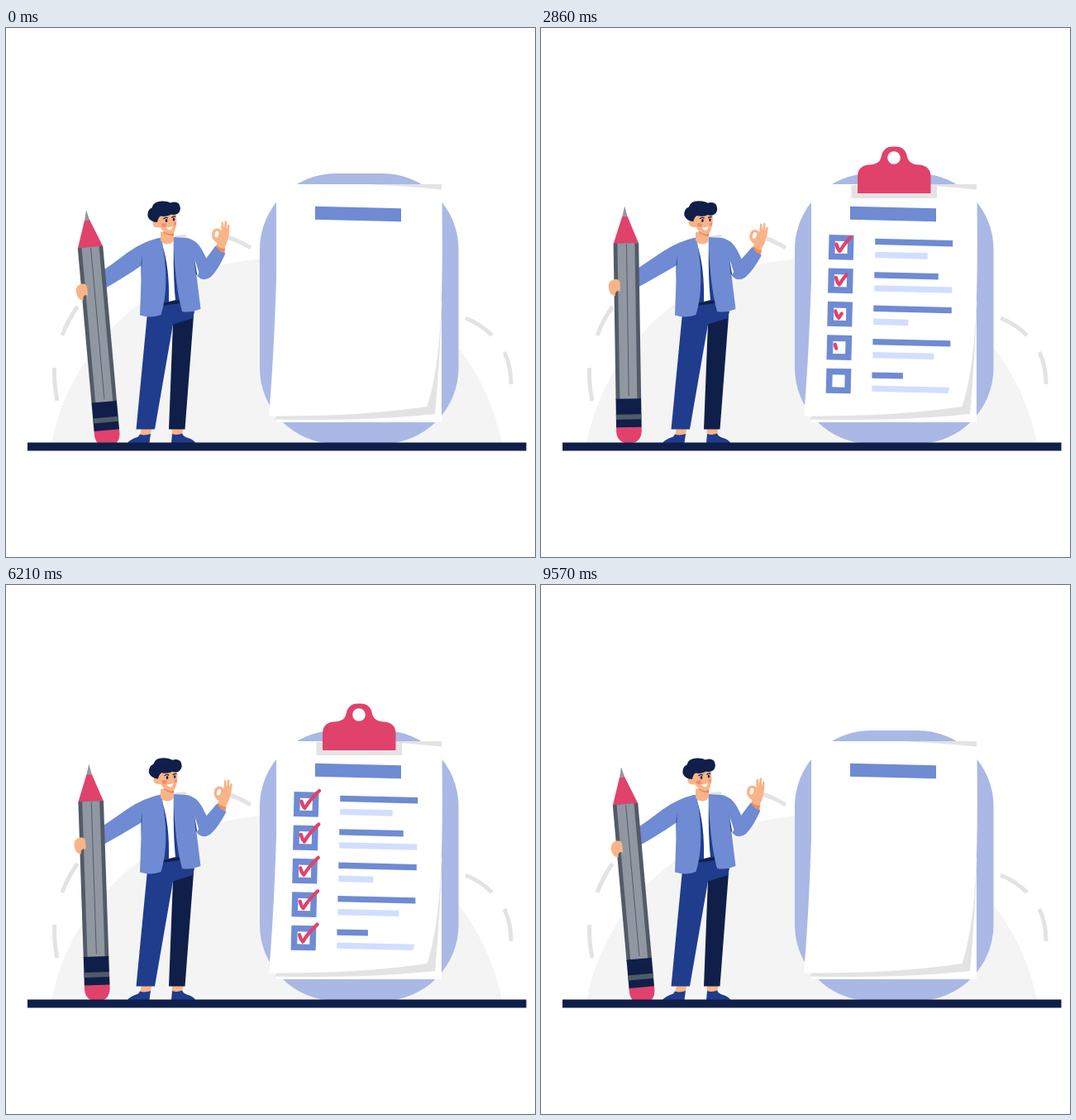
Animation of 640 by 640 pixels, one loop 9.64 s. Source, as an HTML page:

```html
<!DOCTYPE html>
<html lang="en">
<head>
<meta charset="utf-8">
<title>Checklist</title>
<style>
html, body { margin: 0; width: 100%; height: 100%; overflow: hidden; background: #fff; }
svg { display: block; width: 100vw; height: 100vh; }
.navy { fill: #0f1f49; } .deep { fill: #203c8c; } .blue { fill: #6e8bd3; } .pale { fill: #d1deff; }
.pink { fill: #e0426b; } .skin { fill: #f8b487; } .steel { fill: #9097a1; } .slate { fill: #515b68; }
.grey { fill: #e3e3e3; } .white { fill: #fff; }
.dash { fill: none; stroke: #e3e3e3; stroke-width: 5; }
.box { fill: #fff; stroke: #6e8bd3; stroke-width: 7.5; }
.tick { fill: none; stroke: #e0426b; stroke-width: 4.2; stroke-linecap: round; stroke-linejoin: round; }
.line { fill: none; stroke: #0f1f49; stroke-width: 1.3; }
</style>
</head>
<body>
<svg viewBox="0 0 640 640">
  <!-- backdrop -->
  <path fill="#f4f4f4" d="M55 502A278 278 0 0 1 600 502Z"/>
  <path class="dash" d="M62 451Q58 432 58.500 411M68 372Q75 353 86.500 337M204 254Q211 252.500 218 252.500M266 252.500Q282 257 296 266M556 351Q574 358 588 372M603 392Q611 409 611 431"/>

  <!-- board and paper -->
  <rect x="307" y="176" width="240.500" height="327" rx="92" fill="#a9b8e5"/>
  <path class="white" d="M327 189H527V477H327Z"/>
  <path class="grey" d="M437 189H527V196L470 194ZM527.500 330Q525 400 519 467Q430 476 325 473.500L330 465L505 450Z"/>
  <path class="white" d="M329 189H437Q482 191 527.500 195.500C528 300 530 395 509.500 458Q430 470 318 469.500Q328 350 329 189Z"/>
  <path class="blue" d="M374 215.700L478 218.300V234.300L374 231.700Z"/>

  <g id="list">
    <g id="clip">
      <path class="grey" d="M375.500 190H479V206H375.500Z"/>
      <path class="pink" d="M383 200V180Q383 167 396 165.500C407 165 410 162 411.500 156Q414 143.500 425 143.500H429Q441 143.500 443 156C445 162 448 165 458 165.500Q471.500 167 471.500 180V200Z"/>
      <circle class="white" cx="427" cy="157" r="7.800"/>
    </g>
  </g>

  <!-- man -->
  <path class="blue" id="sleeve"/>
  <path class="skin" d="M164 484H176.500L174.500 493H162ZM200.500 484H214.500L213 493H201Z"/>
  <path class="deep" d="M147 502Q151 497 160 494.500L162 491.500Q168 493.500 175 491L173.500 502ZM200 502L201 491Q207 493 213 490.500Q215 495 222 496.500Q228 499 229 502Z"/>
  <path class="navy" d="M202 357L227 348L216.500 485.500H197Z"/>
  <path class="deep" d="M171 345L190 333L211 329L228 343L226 351L202 358.500L180 485.500H157.500Z"/>
  <path class="navy" d="M189 331.500L211 328.500V333L189 336Z"/>
  <path class="deep" d="M187 256L204 254L211 329L189 333Z"/>
  <path class="white" d="M189 257L203 256.500Q202 300 205 329L197 331Q198 290 189 262Z"/>
  <path class="blue" d="M188 253.500Q172 257 163 266L164.500 276L162 347.500Q176 351.500 187.500 347Q199 310 188 253.500ZM202.500 253L219 254Q230 256 237 268L243 280L236 304L228 279L235.500 340Q224 345 213 343Q204 310 202.500 253Z"/>
  <path class="deep" d="M165 275L163.300 307L163.600 285ZM227.500 277L231.500 300L229.500 297Z"/>

  <g id="arm">
    <path class="skin" d="M253.500 266L255.500 260Q249.500 257 249 251Q249 245 253 243Q257 241.500 260.500 245L260.500 236Q261.500 232.500 263 236L264 243L264.500 234.500Q266 231.500 267 235L267 243L268.500 238Q270.500 237 270.500 240Q270.500 254 265 265L264 274Z"/>
    <ellipse class="white" cx="255" cy="249.500" rx="2.300" ry="4" transform="rotate(15 255 249.500)"/>
    <path fill="#ee8c5e" d="M255 262.500Q260 268 265 266.500L264 273L253.500 266Z"/>
    <path class="blue" d="M240.500 281L253.500 263.500Q258 271 265.500 272.500Q257 292 248 301Q239 308 231.500 300Z"/>
  </g>

  <path class="skin" d="M187 247H203V256Q202 261 195 261.500Q189 261 187 257Z"/>
  <g id="head">
    <path fill="#e9805c" d="M189 246L203 248L202.500 251.500Q195 251 189 246Z"/>
    <path class="skin" d="M180 222H205Q207.500 233 205.500 241Q204 249.500 199 249.500Q191 248 186.500 241.500Q178 242 177.500 237Q177 232 181 231Z"/>
    <path class="navy" d="M183 235Q174 234.500 171.500 228Q170.500 220 176.500 217.500Q178 210 188 209.500Q195 209 199 211.500Q205 209 209 212.500Q212.500 218 209.500 223Q206 227.500 200 225.500Q194 229 187 227.500Q184 229 183 235Z"/>
    <ellipse cx="191" cy="238.500" rx="3" ry="2.600" fill="#f58a77"/>
    <ellipse cx="204.500" cy="236.500" rx="1.500" ry="2.300" fill="#f58a77"/>
    <ellipse class="navy" cx="194" cy="233" rx="1.300" ry="1.900"/>
    <ellipse class="navy" cx="203" cy="231.500" rx="1.200" ry="1.900"/>
    <path class="line" d="M190.500 231Q193 228.500 196 230M200.500 229.500Q202 227.500 205 228"/>
    <path class="white" d="M194 241Q198 242 201.500 239.500Q201 244.500 198 244.500Q195 244 194 241Z"/>
  </g>

  <g id="pencil">
    <path class="pink" d="M-15.300 .5L-4 -33H2L15.300 .5ZM-15.300 221H15.300V228Q14 242 0 242Q-14 242 -15.300 228Z"/>
    <path class="steel" d="M-4 -33L-1 -45L2 -33Z"/>
    <path class="slate" d="M-15.300 0H15.300V189H-15.300Z"/>
    <path class="steel" d="M-10.500 0H10.500V189H-10.500Z"/>
    <path d="M.5 1V185" stroke="#515b68"/>
    <path class="navy" d="M-15.300 188H15.300V222.500H-15.300Z"/>
    <path class="slate" d="M-15.300 207H15.300V213H-15.300Z"/>
    <path class="skin" d="M-22 53C-22 45 -17 43 -12 43.500Q-7.500 44 -8 52V58Q-13 56 -14 61V63.500Q-21 63 -22 53Z"/>
  </g>
  <path class="navy" d="M26 501.500H629.500V511.500H26Z"/>
</svg>
<script>
const LOOP = 9640;
const $ = id => document.getElementById(id);
const clamp = v => Math.min(1, Math.max(0, v));
const span = (t, from, length) => clamp((t - from) / length);
const smooth = p => p * p * (3 - 2 * p);

// Cosine-eased value through [time, value] pairs.
function track(keys, t) {
  if (t <= keys[0][0]) return keys[0][1];
  for (let i = 1; i < keys.length; i++) {
    const [t0, a] = keys[i - 1], [t1, b] = keys[i];
    if (t <= t1) return a + (b - a) * (1 - Math.cos(Math.PI * (t - t0) / (t1 - t0))) / 2;
  }
  return keys[keys.length - 1][1];
}

const SWAY = [[0, 0], [2410, 1], [4815, 0], [7050, 1], [7210, 1], [LOOP, 0]];
const POP = [[0, 0], [300, 1.1], [450, .9], [560, 1]];
const WIDTHS = [[94, 63.5], [77.5, 94], [94.5, 42], [94, 74], [37.5, 94]];

function add(tag, attrs) {
  const el = document.createElementNS('http://www.w3.org/2000/svg', tag);
  for (const k in attrs) el.setAttribute(k, attrs[k]);
  return $('list').appendChild(el);
}

const rows = WIDTHS.map((widths, i) => {
  const y = 40.4 * i;
  return {
    x: 363.2 - .8 * i, y: 265.4 + y,
    bars: widths.map((width, j) => ({
      width,
      el: add('path', {
        class: j ? 'pale' : 'blue',
        transform: `translate(${404.2 - .95 * i} ${(j ? 270.8 : 254.8) + y}) skewY(1.4)`
      })
    })),
    box: add('rect', { class: 'box', x: -11.25, y: -11.25, width: 22.5, height: 22.5 }),
    tick: add('path', {
      class: 'tick', pathLength: 1,
      d: 'M357.5 261.5Q358.500 267 361.500 270Q368 259 379 249',
      transform: `translate(${-.6 * i} ${y})`
    })
  };
});

function draw(t) {
  const s = track(SWAY, t), low = 1 - s;
  $('pencil').setAttribute('transform', `translate(${102 + s} ${265 - 5 * s}) rotate(${-5.1 + 4.6 * s})`);
  $('head').setAttribute('transform', `rotate(${4 * s} 195 255)`);
  $('arm').setAttribute('transform', `rotate(${5.3 * s} 240 290)`);
  const dy = 3 * low;
  $('sleeve').setAttribute('d', `M188 253.500Q168 257 148 ${270 + dy / 3}Q130 ${282 + dy} 109 ${296 + dy}V${318 + dy}Q140 ${301 + dy} 166 286L180 270Z`);

  $('list').setAttribute('opacity', 1 - smooth(span(t, 8280, 940)));
  $('clip').setAttribute('opacity', smooth(span(t, 0, 900)));

  rows.forEach((row, i) => {
    row.bars.forEach((bar, j) => {
      const w = bar.width * (1 - (1 - span(t, 740 + 42 * (2 * i + j), 1500)) ** 3);
      const slant = i === 4 && j ? Math.min(2, w) : 0;
      bar.el.setAttribute('d', `M0 0H${w}L${w - slant} 7.300H0Z`);
    });
    const size = track(POP, t - 1010 - 110 * i);
    row.box.setAttribute('transform', `translate(${row.x} ${row.y}) rotate(1.4) scale(${size})`);
    const p = span(t, 1640 + 357 * i, 2050);
    row.tick.setAttribute('stroke-dasharray', `${1 - (1 - p) ** 2} 2`);
    row.tick.setAttribute('visibility', p > 0 ? 'visible' : 'hidden');
  });
}

const start = performance.now();
function frame() {
  draw((performance.now() - start) % LOOP);
  requestAnimationFrame(frame);
}
frame();
</script>
</body>
</html>
```
